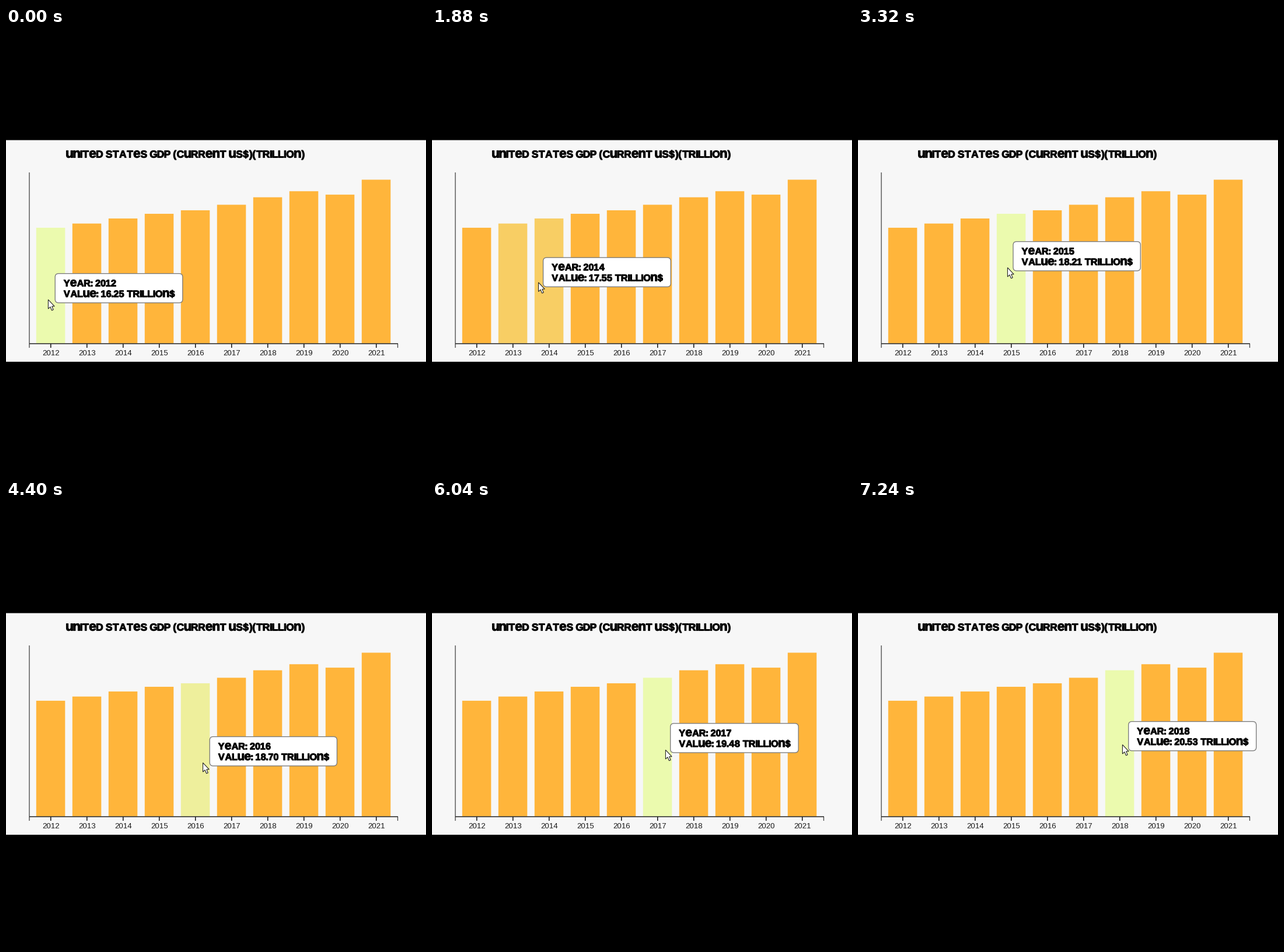
These frames come from a looping animation (720 by 764 pixels, 7.28 s). A matplotlib script:

```python
import numpy as np
import matplotlib.pyplot as plt
from matplotlib.animation import FuncAnimation
from matplotlib.patches import FancyBboxPatch, PathPatch, Polygon, Rectangle
from matplotlib.path import Path
from matplotlib.textpath import TextPath
from matplotlib.transforms import Affine2D

W, H, DPI = 720, 764, 100
STEP, FRAMES = 40, 182
PX = 72 / DPI

ORANGE = np.array([255, 181, 59]) / 255
LIME = np.array([235, 250, 174]) / 255
BAR_X, PITCH, BAR_W = 52, 62, 49.5
BASE, UNIT = 541.5, 12.22
VALUES = [16.25, 16.84, 17.55, 18.21, 18.70, 19.48, 20.53, 21.38, 20.9, 23]
FADE_STEP = STEP / 200

# Turning points of the pointer: time in ms, x, y
STOPS = [
    (400, 72, 466), (840, 130, 466), (1320, 130, 466), (2040, 197, 428),
    (2440, 207, 416), (2600, 207, 416), (2640, 226, 413), (2840, 229, 412),
    (3320, 256, 411), (4240, 299, 441), (4360, 337, 449), (4680, 338, 449),
    (5060, 320, 385), (5400, 344, 415), (6040, 400, 427), (6480, 412, 431),
    (6880, 445, 440), (7080, 447, 438), (7240, 453, 418),
]
stop_times, stop_x, stop_y = np.transpose(STOPS)
times = np.arange(FRAMES) * STEP
tips = np.column_stack([np.interp(times, stop_times, s) for s in (stop_x, stop_y)])


def bar_under(x):
    index, inside = divmod(x - BAR_X, PITCH)
    return int(index) if inside <= BAR_W else None


hovered = [bar_under(x) for x, _ in tips]

# Highlight level of every bar in every frame
levels = np.zeros((FRAMES, len(VALUES)))
levels[0, 0] = 1
for n in range(1, FRAMES):
    change = np.full(len(VALUES), -FADE_STEP)
    if hovered[n - 1] is not None:
        change[hovered[n - 1]] = FADE_STEP
    levels[n] = np.clip(levels[n - 1] + change, 0, 1)
levels = levels * (2 - levels)


def unicase(text, size, gap=1.3, space=5.5):
    """Tight heavy lettering with u, n and e raised to capital height."""
    parts, x = [], 0
    for char in text:
        if char == " ":
            x += space - gap
            continue
        scale = 1.3 if char in "une" else 1
        glyph = TextPath((0, 0), char, size=size * scale,
                         prop=dict(family="Liberation Sans", weight="bold"))
        box = glyph.get_extents()
        parts.append(Affine2D().translate(x - box.x0, 0).scale(1, -1)
                     .transform_path(glyph))
        x += box.width + gap
    return Path.make_compound_path(*parts)


def moved(path, x, y):
    return path.transformed(Affine2D().translate(x, y))


fig = plt.figure(figsize=(W / DPI, H / DPI), dpi=DPI, facecolor="black")
ax = fig.add_axes([0, 0, 1, 1])
ax.set(xlim=(0, W), ylim=(H, 0))
ax.axis("off")


def lettering(path, z):
    patch = PathPatch(path, fc="black", ec="black", lw=1.1 * PX,
                      joinstyle="round", zorder=z)
    return ax.add_patch(patch)


def block(x, y, width, height, color, z):
    return ax.add_patch(Rectangle((x, y), width, height, fc=color, lw=0,
                                  snap=False, zorder=z))


def line(x0, y0, x1, y1, color, width):
    ax.plot([x0, x1], [y0, y1], color=color, lw=width * PX,
            solid_capstyle="butt", snap=False, zorder=3)


block(0, 192.5, W, 380.5, "#f7f7f7", 1)
lettering(moved(unicase("unITeD STATeS GDP (CuRRenT uS$)(TRILLIOn)", 17.3),
                103.5, 222.5), 2)

bars = []
for i, value in enumerate(VALUES):
    x, height = BAR_X + PITCH * i, value * UNIT
    bars.append(block(x - 0.2, BASE - height, BAR_W, height, ORANGE, 2))
    center = x + BAR_W / 2
    line(center, 542, center, 549, "#111111", 1.5)
    ax.text(center, 562.3, str(2012 + i), family="Liberation Sans", size=13.3 * PX,
            color="#1a1a1a", ha="center", va="baseline", zorder=3)
for x, top in ((40, 248), (671.5, 542)):
    line(x, top, x, 549, "#444444", 1.3)
line(40, 542, 672, 542, "#222222", 1.5)

tooltip = ax.add_patch(FancyBboxPatch(
    (0, 0), 219, 50, boxstyle="round,pad=0,rounding_size=6",
    fc="white", ec="#777777", lw=1.3 * PX, zorder=5))
labels = [(unicase(f"YeAR: {2012 + i}", 16.2),
           unicase(f"VALue: {value:.2f} TRILLIOn$", 16.2))
          for i, value in enumerate(VALUES)]
rows = [lettering(path, 6) for path in labels[0]]

ARROW = np.array([(0, 0), (0, 16.5), (3.7, 13), (6.4, 19.4), (9.2, 18.2),
                  (6.6, 12), (11.3, 12)]) * 0.95
pointer = ax.add_patch(Polygon(ARROW, fc="white", ec="#222222", lw=1.1 * PX, zorder=7))


def update(n):
    for bar, level in zip(bars, levels[n]):
        bar.set_facecolor(ORANGE + (LIME - ORANGE) * level)
    pointer.set_xy(ARROW + tips[n] + 0.4)

    # The tooltip trails the pointer by one frame
    last = max(n - 1, 0)
    index = hovered[last]
    for artist in (tooltip, *rows):
        artist.set_visible(index is not None)
    if index is not None:
        left, top = tips[last] + (12.2, -44.4)
        text_width = labels[index][1].get_extents().width
        tooltip.set_bounds(left, top, text_width + 28.5, 50.2)
        for row, path, baseline in zip(rows, labels[index], (22, 40.3)):
            row.set_path(moved(path, left + 14.8, top + baseline))
    return [*bars, tooltip, *rows, pointer]


anim = FuncAnimation(fig, update, frames=FRAMES, interval=STEP,
                     repeat=True, repeat_delay=0, blit=False)
plt.show()
```
